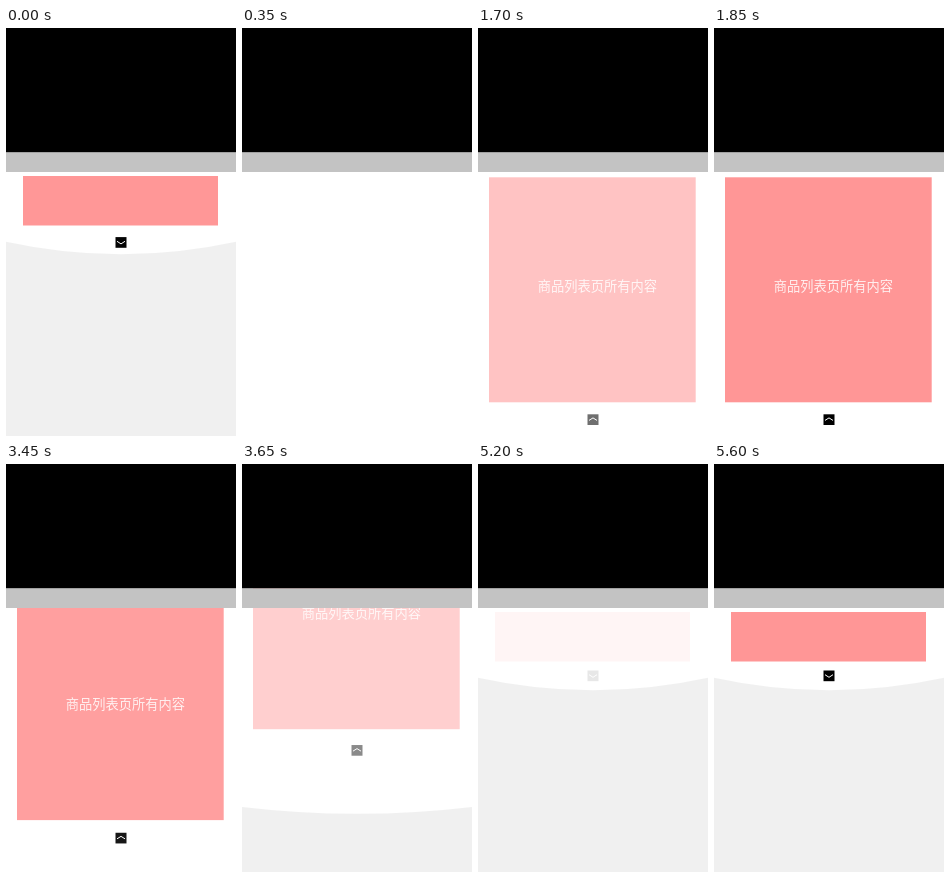
Animation, 230 px wide and 408 px high, one loop 6250 ms. Source, as an HTML page:

```html
<!DOCTYPE html>
<html lang="zh">
<head>
<meta charset="utf-8">
<title>Expanding panel</title>
<style>
  html, body { margin: 0; width: 100%; height: 100%; overflow: hidden; background: #f0f0f0; }
  svg { display: block; width: 100%; height: 100%; }
  .block { fill: #ff9696; }
  .chevron { fill: none; stroke: #fff; stroke-width: 1; }
  text { font: 300 13.25px "Noto Sans CJK SC", "Noto Sans CJK", sans-serif; fill: #fff; fill-opacity: .85; }
</style>
</head>
<body>
<svg viewBox="0 0 230 408">
  <path id="panel" fill="#fff"/>

  <g id="closed">
    <rect class="block" x="17" y="148" width="195" height="49.5"/>
    <g id="down">
      <rect x="109.5" y="206.5" width="11" height="10.7"/>
      <path class="chevron" d="M111 210.7L115 213.3L119 210.7"/>
    </g>
  </g>

  <g id="open">
    <g id="list">
      <rect class="block" x="11" y="149.3" width="206.7" height="225"/>
      <text x="59.8" y="262.8">商品列表页所有内容</text>
    </g>
    <g id="up">
      <rect x="109.5" y="386.3" width="11" height="10.7"/>
      <path class="chevron" d="M111 392.4L115 389.9L119 392.4"/>
    </g>
  </g>

  <rect width="230" height="124.5"/>
  <rect y="124.5" width="230" height="19.5" fill="#c3c3c3"/>
</svg>
<script>
  const LOOP = 6250, TICK = 50;
  const $ = id => document.getElementById(id);
  const [panel, closed, down, open, list, up] =
    ['panel', 'closed', 'down', 'open', 'list', 'up'].map($);

  const ramp = (t, start, duration) => Math.min(1, Math.max(0, (t - start) / duration));
  const mix = (a, b, k) => a + (b - a) * k;
  const shiftY = (el, y) => el.setAttribute('transform', `translate(0 ${y})`);

  function drawPanel(k) {
    const edge = mix(213.8, 498, k), sag = mix(12.5, 0, k);
    panel.setAttribute('d', `M0 0H230V${edge}Q115 ${edge + 2 * sag} 0 ${edge}Z`);
  }

  function draw(time) {
    // The motion advances in 50 ms ticks
    const t = Math.floor((time % LOOP) / TICK) * TICK;
    const opening = ramp(t, -5, 345), closing = ramp(t, 3410, 440);

    drawPanel(ramp(t, 0, 340) - closing);
    closed.setAttribute('opacity', 1 - opening + ramp(t, 5162, 430));
    open.setAttribute('opacity', ramp(t, 1512, 335) - closing);
    shiftY(down, t < 1000 ? 179 * opening : 0);
    shiftY(list, -200 * closing);
    shiftY(up, -193 * closing);
  }

  const start = performance.now();
  function frame(now) {
    draw(Math.max(0, now - start));
    requestAnimationFrame(frame);
  }
  draw(0);
  requestAnimationFrame(frame);
</script>
</body>
</html>
```
